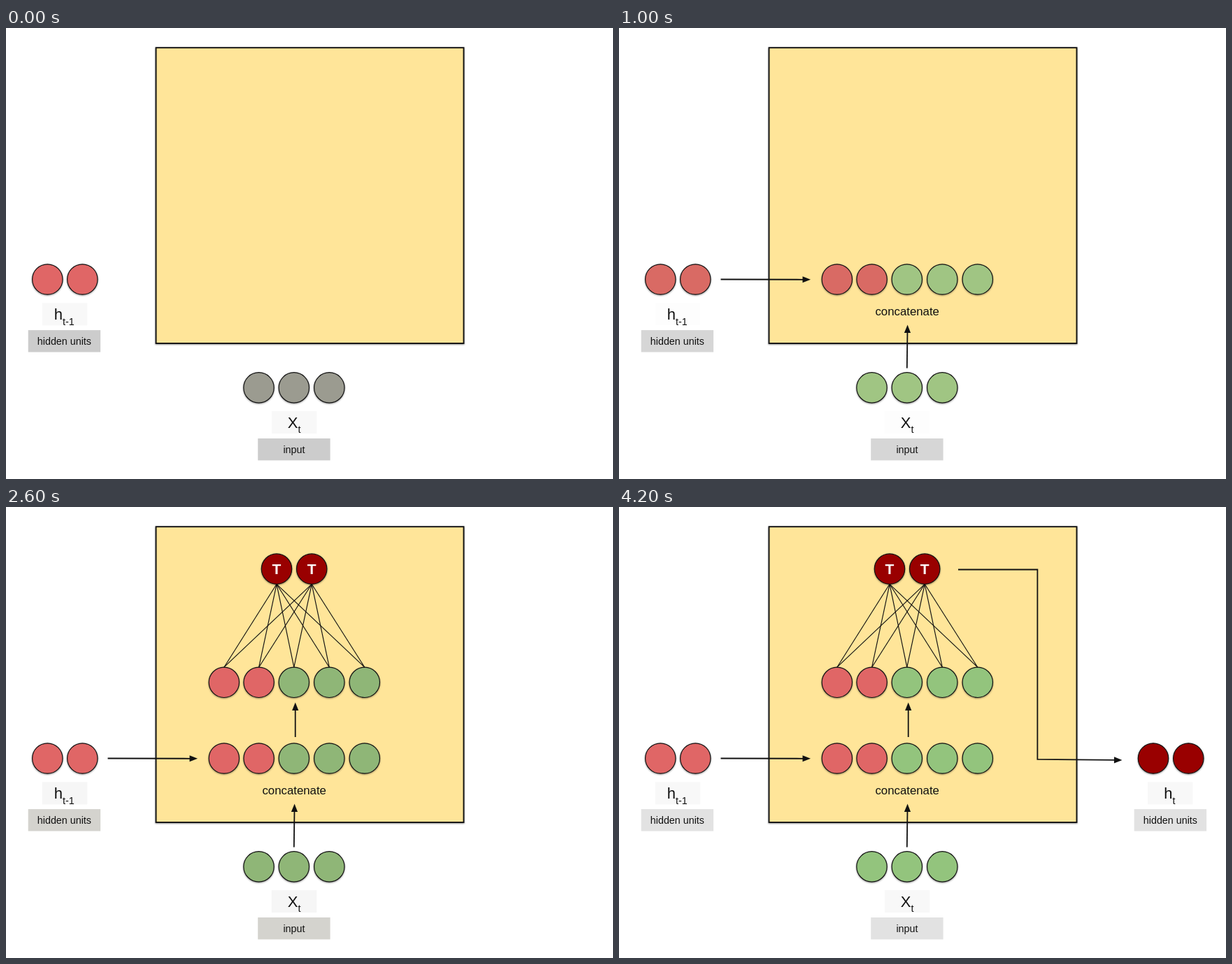
These frames come from a looping animation (868x645 px, 5000 ms). An HTML page:

```html
<!DOCTYPE html>
<html lang="en">
<head>
<meta charset="utf-8">
<title>Recurrent cell</title>
<style>
  html, body { margin: 0; width: 100%; height: 100%; overflow: hidden; background: #fff; }
  svg { display: block; width: 868px; height: 645px; font-family: "Liberation Sans", Arial, sans-serif; }
  circle { stroke: #111; stroke-width: 1.2; }
  .hidden { fill: var(--hidden); }
  .input { fill: var(--input); }
  .out { fill: #990000; }
  .tag { fill: var(--tag); }
  .symbol { fill: var(--symbol); }
  .shadow { filter: drop-shadow(.5px 1.8px 1.1px rgba(0, 0, 0, .42)); }
  .wire { fill: none; stroke: #111; stroke-width: 1.8; }
  .net { fill: none; stroke: #111; stroke-width: 1.15; }
</style>
</head>
<body>
<svg id="stage" viewBox="0 0 868 645"></svg>
<script>
const NS = "http://www.w3.org/2000/svg";
const stage = document.getElementById("stage");
const LOOP = 5000;

// Each step shows the layers up to its index, with its own tones.
const steps = [
  { at: 0,    hidden: "#e06666", input: "#9b9b90", tag: "#cccccc", symbol: "#f8f8f8" },
  { at: 1000, hidden: "#d96a64", input: "#a0c583", tag: "#d6d6d6", symbol: "#fdfdfd" },
  { at: 2000, hidden: "#e06666", input: "#8fb677", tag: "#d4d3ce", symbol: "#f6f6f6" },
  { at: 3000, hidden: "#e06666", input: "#93c47d", tag: "#e2e2e2", symbol: "#f8f8f8" }
];

function add(parent, name, attrs, text) {
  const el = document.createElementNS(NS, name);
  for (const key in attrs) el.setAttribute(key, attrs[key]);
  if (text) el.textContent = text;
  parent.appendChild(el);
  return el;
}

function row(parent, xs, y, kind) {
  const g = add(parent, "g", { class: "shadow" });
  xs.forEach((cx, i) => add(g, "circle", { cx, cy: y, r: 21.7, class: kind(i) }));
}

function label(parent, x, y, size, text, extra) {
  add(parent, "text", { x, y, "font-size": size, "text-anchor": "middle", fill: "#111", ...extra }, text);
}

function tag(parent, x, y, text) {
  add(parent, "rect", { x, y, width: 103.4, height: 31.4, class: "tag" });
  label(parent, x + 51.7, y + 21, 14.3, text);
}

function symbol(parent, x, y, dx, main, sub) {
  add(parent, "rect", { x, y, width: 64.5, height: 32, class: "symbol" });
  const t = add(parent, "text", { x: x + dx, y: y + 23.8, "font-size": 22, fill: "#111" }, main);
  add(t, "tspan", { dy: 7.6, "font-size": 14.4 }, sub);
}

function arrow(parent, points) {
  const [x1, y1] = points[points.length - 2];
  const [x2, y2] = points[points.length - 1];
  const angle = Math.atan2(y2 - y1, x2 - x1);
  const back = [x2 - 10 * Math.cos(angle), y2 - 10 * Math.sin(angle)];
  add(parent, "polyline", { points: [...points.slice(0, -1), back].join(" "), class: "wire" });
  add(parent, "path", {
    d: "M0 0L-11.5 -4.6V4.6Z", fill: "#111",
    transform: `translate(${x2} ${y2}) rotate(${angle * 180 / Math.PI})`
  });
}

const layers = steps.map(() => add(stage, "g", {}));
const [base, joined, dense, output] = layers;

const pair = [59.3, 109.3];
const inputs = [361.5, 411.8, 462.3];
const five = [311.8, 361.6, ...inputs.slice(1), 512.8];
const tops = [387, 437.2];
const joinKind = i => i < 2 ? "hidden" : "input";

add(base, "rect", {
  x: 214.5, y: 28.2, width: 440, height: 422.8,
  fill: "#ffe599", stroke: "#111", "stroke-width": 1.9, class: "shadow"
});
row(base, pair, 359.5, () => "hidden");
row(base, inputs, 514.4, () => "input");
symbol(base, 51.7, 393.3, 17, "h", "t-1");
tag(base, 31.7, 432.1, "hidden units");
symbol(base, 379.8, 548, 22.9, "X", "t");
tag(base, 360.2, 587, "input");

arrow(joined, [[145.5, 359.5], [274, 359.8]]);
arrow(joined, [[411.8, 486.5], [412.6, 424.5]]);
row(joined, five, 359.5, joinKind);
label(joined, 412.2, 410.6, 16.8, "concatenate");

arrow(dense, [[413.7, 329], [413.7, 279.5]]);
row(dense, five, 250.8, joinKind);
row(dense, tops, 88.6, () => "out");
for (const top of tops) {
  label(dense, top, 96, 21, "T", { fill: "#fff", "font-weight": "bold" });
  for (const x of five) add(dense, "line", { x1: top, y1: 110.3, x2: x, y2: 229.2, class: "net" });
}

arrow(output, [[485, 89.5], [598.4, 89.5], [598.4, 360.8], [719.5, 362]]);
row(output, [764, 814.3], 359.5, () => "out");
symbol(output, 756, 393.3, 23.2, "h", "t");
tag(output, 736.7, 432.1, "hidden units");

let shown = -1;
function draw() {
  const time = performance.now() % LOOP;
  const now = steps.findLastIndex(s => time >= s.at);
  if (now !== shown) {
    shown = now;
    layers.forEach((g, i) => g.style.display = i <= now ? "" : "none");
    for (const key of ["hidden", "input", "tag", "symbol"]) {
      stage.style.setProperty("--" + key, steps[now][key]);
    }
  }
  requestAnimationFrame(draw);
}
draw();
</script>
</body>
</html>
```
